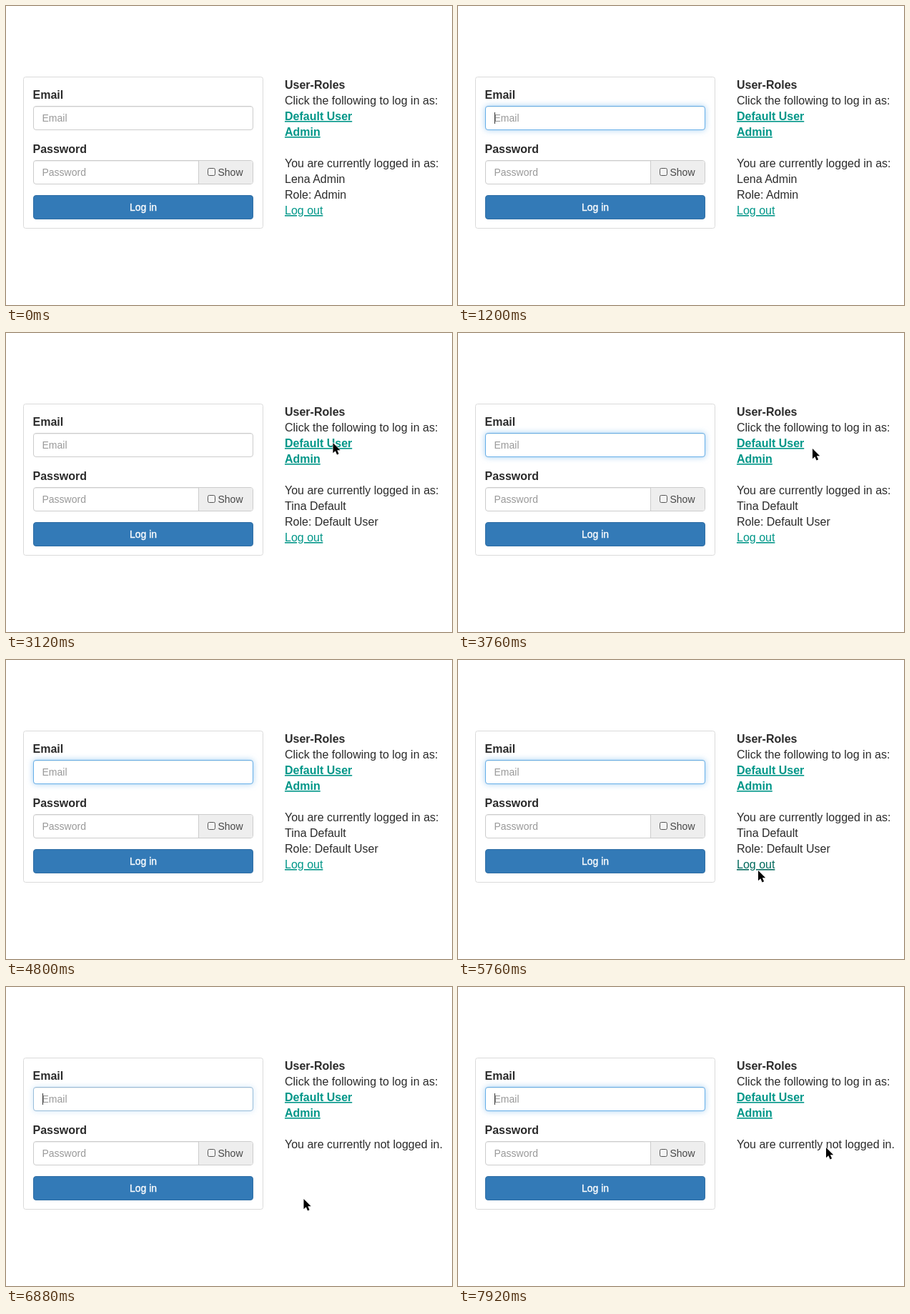
Animation of 624x419 px, one loop 8 s. Source, as an HTML page:

```html
<!DOCTYPE html>
<html lang="en">
<head>
<meta charset="utf-8">
<title>Login form</title>
<style>
  html, body { margin: 0; width: 100%; height: 100%; overflow: hidden; background: #fff; }
  svg { display: block; width: 624px; height: 419px; }
  text { font: 16px "Liberation Sans", Arial, sans-serif; fill: #2b2b2b; }
  .bold { font-weight: bold; }
  .link { fill: #009688; text-decoration: underline; }
  .link.hover { fill: #00695c; }
  .small { font-size: 14px; }
  .hint { fill: #999; }
  .box { fill: #fff; stroke: #ccc; }
  #focus { stroke: #66afe9; filter: drop-shadow(0 0 4px rgba(102, 175, 233, .6)); }
</style>
</head>
<body>
<svg viewBox="0 0 624 419">
  <rect x="24.5" y="99.5" width="335" height="212" rx="3" fill="#fff" stroke="#dadada"/>

  <text class="bold" x="37.5" y="130">Email</text>
  <rect class="box" x="38.5" y="140.5" width="307" height="33" rx="3.5"/>
  <rect id="focus" class="box" x="38.5" y="140.5" width="307" height="33" rx="3.5"/>
  <path d="M41 141.5H343" stroke="#000" stroke-opacity=".07"/>
  <text class="small hint" x="50.5" y="162">Email</text>
  <path id="caret" d="M51.5 149V165" stroke="#333"/>

  <text class="bold" x="37.5" y="206">Password</text>
  <rect class="box" x="38.5" y="216.5" width="307" height="33" rx="3.5"/>
  <path d="M269.5 217H342A3 3 0 0 1 345 220V246A3 3 0 0 1 342 249H269.5Z" fill="#eee"/>
  <path d="M269.5 217V249" stroke="#ccc"/>
  <path d="M41 217.5H269" stroke="#000" stroke-opacity=".07"/>
  <text class="small hint" x="50.5" y="238">Password</text>
  <rect x="282.5" y="227.5" width="10" height="10" rx="2" fill="#f4f4f4" stroke="#555"/>
  <text class="small" x="296.5" y="238" style="fill:#484848">Show</text>

  <rect x="38.5" y="265.5" width="307" height="33" rx="3.5" fill="#337ab7" stroke="#2e6da4"/>
  <text class="small" x="192" y="287" text-anchor="middle" style="fill:#fff;stroke:#fff;stroke-width:.35">Log in</text>

  <text class="bold" x="390" y="116">User-Roles</text>
  <text x="390" y="138">Click the following to log in as:</text>
  <text id="userLink" class="bold link" x="390" y="160">Default User</text>
  <text class="bold link" x="390" y="182">Admin</text>
  <text id="status" x="390" y="226"></text>
  <text id="person" x="390" y="248"></text>
  <text id="role" x="390" y="270"></text>
  <text id="logout" class="link" x="390" y="292">Log out</text>

  <path id="cursor" d="M0 0V14.2L3.3 11.2L5.6 16.4L8.1 15.3L5.8 10.3H10.2Z"
        fill="#000" stroke="#fff" stroke-width="1.2" stroke-linejoin="round" paint-order="stroke"/>
</svg>
<script>
const LOOP = 8000, STEP = 80;
const $ = id => document.getElementById(id);
const clamp = v => Math.max(0, Math.min(1, v));

// Email field focus: time of blink phase zero, focus, blur
const focusSpans = [[240, 320, 2480], [3280, 3360, 6160], [6880, 6880, 9000]];

// Pointer visits: hidden-from time, then [time, x, y] stops
const visits = [
  { end: 3840, stops: [[1680, 585, 210], [1920, 524, 181], [2240, 457.5, 154],
                       [3680, 457.5, 154], [3760, 496, 162]] },
  { end: 7200, stops: [[5360, 573, 315], [5520, 494, 306], [5680, 426, 296], [5760, 420, 295],
                       [5920, 420, 295], [6000, 416.5, 297], [6880, 416.5, 297], [7120, 608, 316]] },
  { end: LOOP, stops: [[7760, 576, 236], [7920, 515, 225]] }
];

function pointerAt(t) {
  const visit = visits.find(v => t >= v.stops[0][0] && t < v.end);
  if (!visit) return null;
  const { stops } = visit;
  const i = stops.findIndex(s => s[0] > t);
  if (i < 0) return stops[stops.length - 1].slice(1);
  const [t0, x0, y0] = stops[i - 1], [t1, x1, y1] = stops[i];
  const k = (t - t0) / (t1 - t0);
  return [x0 + (x1 - x0) * k, y0 + (y1 - y0) * k];
}

function glowAt(t) {
  return Math.max(...focusSpans.map(([, on, off]) =>
    t < on ? 0 : t < off ? clamp((t - on + 80) / 160) : clamp(1 - (t - off + 40) / 160)));
}

function caretAt(t) {
  const span = focusSpans.find(([, on, off]) => t >= on && t < off);
  return !!span && Math.floor((t - span[0]) / 480) % 2 === 0;
}

function sessionAt(t) {
  const hello = "You are currently logged in as:";
  if (t < 3120) return [hello, "Lena Admin", "Role: Admin"];
  if (t < 6720) return [hello, "Tina Default", "Role: Default User"];
  return ["You are currently not logged in.", "", ""];
}

const show = (el, on) => el.setAttribute("visibility", on ? "visible" : "hidden");

function render(time) {
  const t = Math.floor((time % LOOP) / STEP) * STEP;
  $("focus").setAttribute("opacity", glowAt(t));
  show($("caret"), caretAt(t));

  sessionAt(t).forEach((line, i) => {
    $(["status", "person", "role"][i]).textContent = line;
  });
  show($("logout"), t < 6720);
  $("userLink").classList.toggle("hover", t >= 2080 && t < 3120);
  $("logout").classList.toggle("hover", t >= 5680);

  const p = pointerAt(t);
  show($("cursor"), p);
  if (p) $("cursor").setAttribute("transform", `translate(${p})`);
}

const start = performance.now();
function tick() {
  render(performance.now() - start);
  requestAnimationFrame(tick);
}
tick();
</script>
</body>
</html>
```
